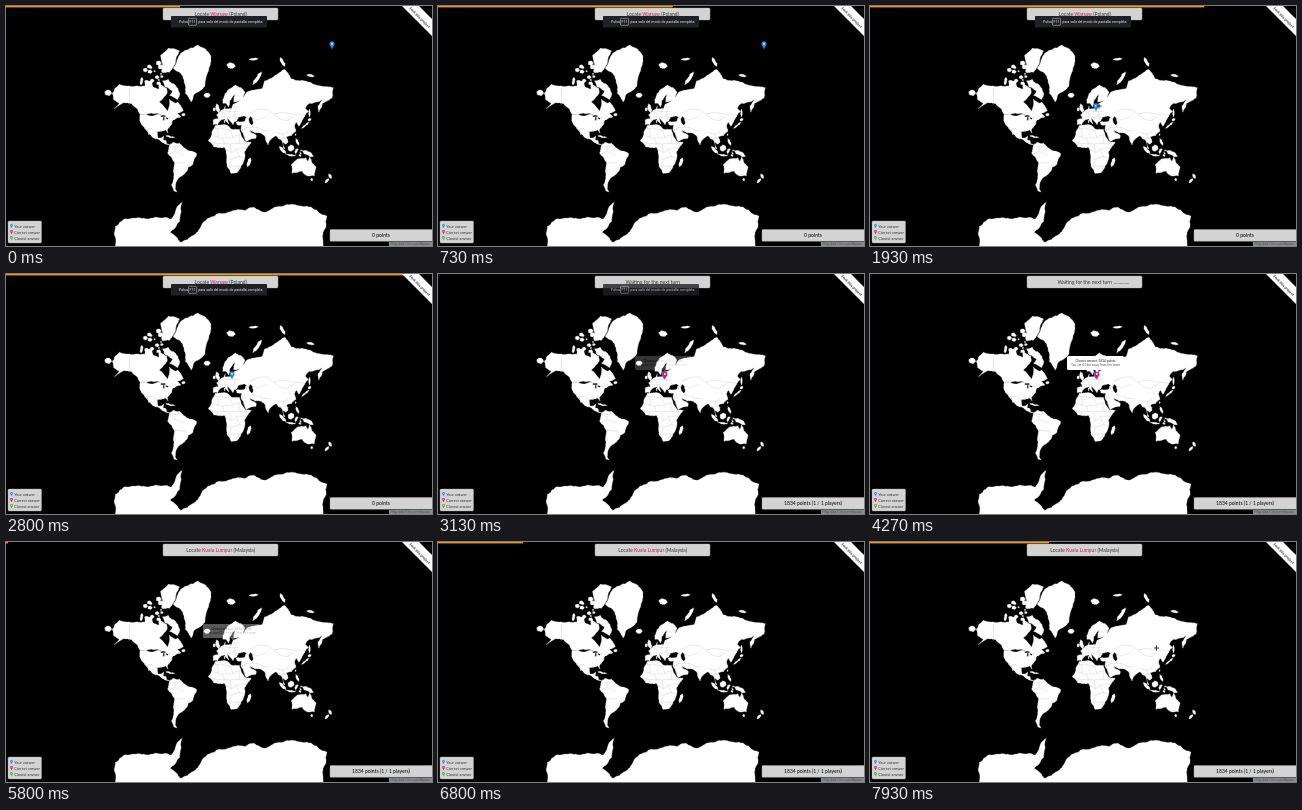
Write an HTML page that moves like this. It is 426 px wide and 240 px high and loops after 8 s.

```html
<!DOCTYPE html>
<html lang="en">
<head>
<meta charset="utf-8">
<title>Map quiz</title>
<style>
  html, body { margin: 0; width: 100%; height: 100%; overflow: hidden; background: #000; }
  svg { display: block; width: 100%; height: 100%; }
  text { font-family: Lato, sans-serif; font-size: 5px; fill: #333; }
  .mid { text-anchor: middle; }
  .panel { fill: #d3d3d3; stroke: #aaa; stroke-width: .4; }
  .small { font-size: 3.8px; }
  .hint { font-family: Roboto, sans-serif; font-size: 3.55px; fill: #eee; }
  .tiny { font-size: 3.2px; fill: #555; }
  #land path { stroke-width: .3; stroke-linejoin: round; }
  #borders { fill: none; stroke: #bbb; stroke-width: .35; mix-blend-mode: darken; }
</style>
</head>
<body>
<svg viewBox="0 0 426 240" preserveAspectRatio="none">
  <defs>
    <g id="pin">
      <path d="M0 0C-.5-2.6-2.6-3.800-2.600-6A2.600 2.600 0 0 1 2.600-6C2.600-3.800 .5-2.600 0 0Z"/>
      <circle cy="-6" r=".9" fill="#fff"/>
    </g>
  </defs>
  <rect width="426" height="240"/>
  <g id="land"></g>
  <path id="borders"/>

  <use id="yours" href="#pin" fill="#2f86d0"/>
  <use id="answer" href="#pin" fill="#c81e6a" transform="translate(226.900 106)"/>
  <g id="tip">
    <path d="M198.500 82H252.500Q254 82 254 83.500V94.500Q254 96 252.500 96H229L227 98.500L225 96H198.500Q197 96 197 94.500V83.500Q197 82 198.500 82Z" fill="#fff"/>
    <text class="tiny mid" x="225.500" y="87.700" font-weight="700">Closest answer: 1834 points</text>
    <text class="tiny mid" x="225.500" y="92.400">You are 61 km away from the town</text>
  </g>
  <path id="cursor" d="M-2.600 0H2.600M0-2.600V2.600" stroke="#000" stroke-width=".8"/>

  <rect id="bar" height="1.400" fill="#dc9a3c"/>
  <rect class="panel" x="157" y="2" width="115" height="12" rx="1.200"/>
  <text id="title" class="mid" x="214.700" y="10.400"></text>
  <text id="dots" x="244" y="10.400"></text>
  <g id="hint">
    <rect x="165" y="10" width="96" height="11.500" rx=".8" fill="#202124"/>
    <rect x="182.500" y="12.300" width="8" height="7" rx=".8" fill="none" stroke="#ccc" stroke-width=".5"/>
    <text class="hint" x="173" y="17.200">Pulsa</text>
    <text class="hint mid" x="186.500" y="17.200">F11</text>
    <text class="hint" x="192.300" y="17.200">para salir del modo de pantalla completa</text>
  </g>

  <rect class="panel" x="2" y="215" width="33.500" height="22" rx="1.200"/>
  <g id="legend"></g>
  <rect class="panel" x="324" y="223.500" width="103" height="11.800" rx="1"/>
  <text id="points" class="mid" x="375" y="231.300" font-weight="500" style="fill:#111"></text>
  <rect x="383" y="236" width="43" height="4" fill="#858a8d"/>
  <text class="tiny" x="385" y="239.200">Map data © its contributors</text>

  <path d="M396 0H413L426 13V30Z" fill="#fff"/>
  <text class="small mid" font-weight="700" transform="translate(413.200 12) rotate(45)" y=".6">Fork this project</text>
</svg>

<script>
const $ = id => document.getElementById(id);

let seed = 7;
const jitter = size => {
  seed = (seed * 16807) % 2147483647;
  return (seed / 2147483647 * 2 - 1) * size;
};

// Mercator projection to stage pixels
const project = (lon, lat) => [213 + .635 * lon, 144 - 36.4 * Math.log(Math.tan(Math.PI / 4 + lat * Math.PI / 360))];
const parse = points => points.split(' ').map(p => project(...p.split(',').map(Number)));
const toPath = points => 'M' + points.map(p => p.map(v => v.toFixed(1)).join(' ')).join('L');

// Midpoint displacement turns a straight edge into a ragged coast
function roughen(a, b) {
  const dx = b[0] - a[0], dy = b[1] - a[1];
  if (Math.hypot(dx, dy) < 2.2) return [a];
  const k = jitter(.1), mid = [(a[0] + b[0]) / 2 - dy * k, (a[1] + b[1]) / 2 + dx * k];
  return [...roughen(a, mid), ...roughen(mid, b)];
}

function addShape(corners, color = '#fff') {
  const outline = corners.flatMap((p, i) => roughen(p, corners[(i + 1) % corners.length]));
  $('land').insertAdjacentHTML('beforeend', `<path d="${toPath(outline)}Z" fill="${color}" stroke="${color}"/>`);
}

// A long island or lake between two places
function addSliver(ends, width, color) {
  const [a, b] = parse(ends);
  const dx = b[0] - a[0], dy = b[1] - a[1], k = width / 2 / Math.hypot(dx, dy);
  const side = (along, s) => [a[0] + dx * along - dy * k * s, a[1] + dy * along + dx * k * s];
  addShape([a, side(.25, 1), side(.75, 1), b, side(.75, -1), side(.25, -1)], color);
}

function scatter(count, lon, lat, spread, size) {
  const [cx, cy] = project(lon, lat);
  for (let i = 0; i < count; i++) {
    const x = cx + jitter(spread), y = cy + jitter(spread * .8), r = size + jitter(size / 2);
    addShape([0, 1, 2, 3, 4].map(n => [x + r * Math.cos(n * 1.257), y + r * .8 * Math.sin(n * 1.257)]));
  }
}

const continents = {
  canada: '-168,66 -157,71.3 -128,70.5 -95,68.5 -94,72 -82,69 -82,66 -94,60 -81,52 -78,62.3 -69,59 -65,60 -56,52.5 -66,50 -60,46 -70,43 -83,42 -90,48 -124,49 -137,58.5 -152,59 -165,54.6 -157,59 -166,62',
  usa: '-124,49 -89,49 -83,44 -68,46 -76,36 -81,31 -80,25.5 -84,30 -97,28 -96,18.5 -91,18.7 -87,21.4 -88,16 -83.5,15 -83,10 -77.5,8 -84,9 -94,16 -105.5,20 -114,31 -110,23 -118,34 -124,40',
  southAmerica: '-78,8 -72,12 -62,10.5 -50,0 -35,-6 -39,-14 -41,-22 -48.5,-26 -57,-37 -65,-42 -69,-52 -66,-55 -71,-54 -75,-48 -70.5,-18.5 -81,-5',
  greenland: '-72,78 -60,82 -33,83.6 -13,81.5 -20,75 -22,70.5 -40,65 -44,60 -53,66 -53,71 -60,76',
  africa: '-6,36 10,37 20,31 32,31 37,19 43,12 51,12 40,-3 40,-15 35,-24 27,-34 19,-34.5 12,-17 9,4 -8,4.5 -17,14.5 -10,30',
  europe: '-9,43 -9,37 -2,37 3,42.5 9,44 16,38 13,45 22,37 24,40.5 28,41.5 31,46 39,47 60,48 60,66 35,64 30,60 22,58 20,54.5 10,54 10,57 8,54 -4,48.4 -1,44',
  scandinavia: '32,61 23,60 25,65.5 17,61 15,56 11,59 6,59 6,62 15,68.5 26,71 41,67 38,64',
  northAsia: '38,60 44,67 68,69 72,73 87,75 104,77.5 113,74 140,72.5 180,69.5 178,63 163,59 157,51 156,57 163,62 142,59 136,54.5 141,52 131,42.5 110,40 55,44 42,46',
  southAsia: '27,40 28,37 36,36.5 35,29 39,21 43,13 58,18 59,22 50,27 48,30 57,26 67,25 73,20 77.5,8 80,15 90,22 94,17 98,16 101,3 104,1.5 100,13 105,9 109,12.5 106,20 114,22 121,28 119,36 121.5,40.5 126,35 131,43 120,50 55,50 42,45 41,41.5 30,41',
  australia: '114,-22 130,-13 137,-12 140,-17.5 142.5,-11 146,-19 153,-26 150,-37.5 140,-38 131,-31.5 115,-34.5',
  antarctica: '-165,-84 -163,-76 -150,-73 -130,-72.5 -100,-72 -75,-73 -67,-67 -58,-63.3 -62,-74 -77,-78 -60,-81 -40,-79 -17,-72.5 0,-70 40,-68.5 55,-66.5 72,-69.5 87,-66.5 135,-66 170,-71.5 165,-84',
  baffin: '-78,65 -65,62 -62,66.5 -80,73.7 -89,73 -85,70 -73,67.5',
  victoria: '-117,69 -103,69 -106,73 -117,73',
  ellesmere: '-90,76.5 -78,76.5 -62,82.5 -80,83 -92,81.5'
};

for (const points of Object.values(continents)) addShape(parse(points));

const islands = {
  banks: ['-123,71 -121,74.5', 2.5], newfoundland: ['-59,48 -53,49', 2.5], chukotka: ['-180,67 -169,66', 5],
  cuba: ['-84,22 -69,19', 1.3], iceland: ['-24,65 -13.5,65', 4], ireland: ['-8,52 -7,55.3', 2.2],
  britain: ['0,50.5 -4,58.7', 3.2], spitsbergen: ['12,79 26,78.5', 5], novayaZemlya: ['53,71 67,76.7', 3.4],
  franzJosef: ['47,80.5 62,80.7', 2], severnaya: ['96,81 104,78.5', 3], newSiberian: ['138,75.5 150,75', 2],
  sakhalin: ['142.5,46 142.5,54', 1.3], honshu: ['130,32 142,40', 1.7], hokkaido: ['140,42 145,44', 2.2],
  philippines: ['121,18 126,7', 2], sumatra: ['95,5.5 106,-6', 2.8], java: ['105,-7 121,-9', 1],
  borneo: ['109,0 118,6', 5.5], sulawesi: ['120,-5 123,1', 2], newGuinea: ['131,-1 149,-10', 4],
  tasmania: ['145,-41 147,-43.5', 2], northNZ: ['173,-35 177,-41', 2], southNZ: ['173,-41 167,-46', 2],
  madagascar: ['45,-25.5 49.5,-12', 3.2], taiwan: ['121,25 120.5,22', .9], sardinia: ['9,43 9,39', .8]
};
for (const [ends, width] of Object.values(islands)) addSliver(ends, width);
scatter(14, -102, 75.5, 11, 1.7);
scatter(6, -90, 79.5, 5, 2);
scatter(8, 125, -4, 5, .7);

const lakes = { caspian: ['49,46.5 52,36.7', 3.2], superior: ['-92,47 -84,47', 1.2], michigan: ['-87,46 -87,42', .9], huron: ['-84,45 -80,44', 1] };
for (const [ends, width] of Object.values(lakes)) addSliver(ends, width, '#000');

// Countries: ragged brick cells; darkening keeps them off the black sea
function countries(west, north, east, south, cell) {
  const [x0, y0] = project(west, north), [x1, y1] = project(east, south);
  const cols = Math.round((x1 - x0) / cell), rows = Math.round((y1 - y0) / cell);
  const grid = Array.from({ length: rows + 1 }, (_, r) => Array.from({ length: cols + 1 }, (_, c) =>
    [x0 + c * cell + jitter(cell * .3), y0 + r * cell + jitter(cell * .3)]));
  let path = '';
  for (let r = 0; r < rows; r++) for (let c = 0; c < cols; c++) {
    const here = grid[r][c];
    path += toPath([...roughen(here, grid[r][c + 1]), grid[r][c + 1]]);
    if ((r + c) % 2) path += toPath([...roughen(here, grid[r + 1][c]), grid[r + 1][c]]);
  }
  return path;
}

const frontiers = ['-124,49 -95,49 -83,45 -75,45 -68,47', '-141,70 -141,60 -131,55', '-117,32.5 -106,31.7 -97.5,26',
  '48,50 62,54 75,54 87,49 98,51 117,49 135,48', '87,49 97,43 108,42 118,47'];
$('borders').setAttribute('d', frontiers.map(f => toPath(parse(f))).join('')
  + countries(-17, 32, 45, -33, 7.5) + countries(-8, 56, 34, 38, 5)
  + countries(-80, 8, -50, -36, 9) + countries(36, 44, 80, 16, 9) + countries(92, 27, 110, 8, 6));

$('legend').innerHTML = [['#2f86d0', 'Your answer'], ['#c81e6a', 'Correct answer'], ['#5aa545', 'Closest answer']]
  .map(([color, label], i) => `<use href="#pin" fill="${color}" transform="translate(5.500 ${222.2 + 6 * i}) scale(.5)"/>
    <text class="small" x="8.300" y="${221.8 + 6 * i}">${label}</text>`).join('');

const LOOP = 8000, CLICK = 1730, TURN_END = 3040, NEXT_TURN = 5670, BAR_SPEED = .083;
const ramp = (t, from, to) => Math.min(1, Math.max(0, (t - from) / (to - from)));
const place = (id, x, y) => $(id).setAttribute('transform', `translate(${x} ${y})`);
const show = (id, opacity) => $(id).setAttribute('opacity', +opacity);
const setHTML = (id, html) => { if ($(id).innerHTML !== html) $(id).innerHTML = html; };
const question = (city, country) => `Locate <tspan style="fill:#d3135a">${city}</tspan> (${country})`;

function glide(t, from, to, [x0, y0], [x1, y1]) {
  const k = ramp(t, from, to), ease = k * k * (3 - 2 * k);
  place('cursor', x0 + (x1 - x0) * ease, y0 + (y1 - y0) * ease);
}

function draw(t) {
  const first = t < TURN_END, waiting = !first && t < NEXT_TURN;
  $('bar').setAttribute('width', first ? 174 + BAR_SPEED * t : Math.max(0, BAR_SPEED * (t - 5776)));
  setHTML('title', first ? question('Warsaw', 'Poland')
    : waiting ? 'Waiting for the next turn' : question('Kuala Lumpur', 'Malaysia'));
  setHTML('dots', waiting ? '.'.repeat(Math.floor(13 * ramp(t, 3150, 4070))) : '');
  setHTML('points', first ? '0 points' : '1834 points (1 / 1 players)');

  if (t < CLICK) place('yours', 326, 43.8);
  else place('yours', 226, 105.8);
  show('yours', t < NEXT_TURN);
  show('answer', waiting);
  show('hint', 1 - ramp(t, 3070, 3370));
  show('tip', ramp(t, 3090, 3290) * (1 - ramp(t, NEXT_TURN, NEXT_TURN + 200)));

  if (t < NEXT_TURN) glide(t, 2000, 2600, [229, 100], [214, 142]);
  else glide(t, 7400, 7800, [310, 114], [286.5, 106]);
  show('cursor', t > 7400 || (t > CLICK && t < 2600));
}

const start = performance.now();
function frame() {
  draw((performance.now() - start) % LOOP);
  requestAnimationFrame(frame);
}
frame();
</script>
</body>
</html>
```
